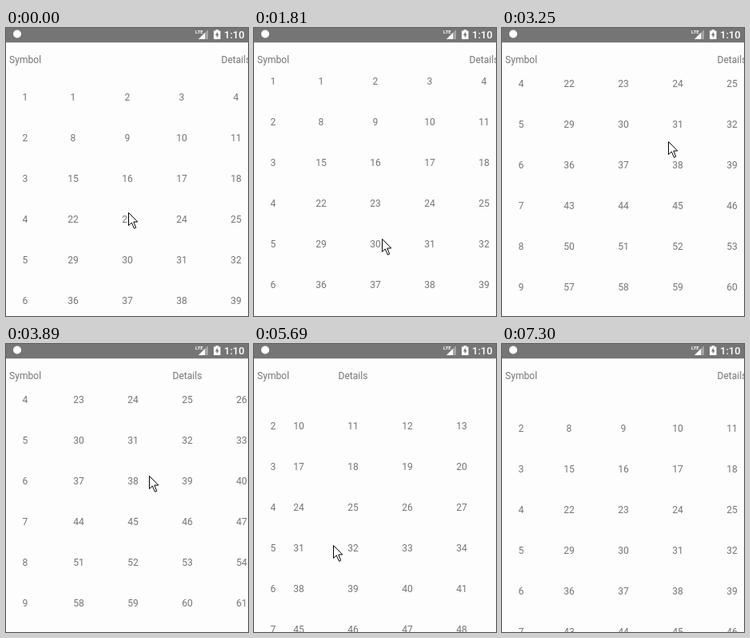
Recreate the animation shown at these times as an HTML page. Size 303 by 361 pixels, loop 7970 ms.

```html
<!DOCTYPE html>
<html lang="en">
<head>
<meta charset="utf-8">
<title>Scrolling table</title>
<style>
  html, body { margin: 0; width: 100%; height: 100%; overflow: hidden; background: #fdfdfd; }
  svg { display: block; }
  text { font: 12.1px Roboto, sans-serif; fill: #757575; }
  .mid { text-anchor: middle; }
  .clock { font-size: 13px; font-weight: 500; fill: #fff; }
  .lte { font-size: 6px; font-weight: 700; fill: #fff; }
</style>
</head>
<body>
<svg width="303" height="361" viewBox="0 0 303 361">
  <rect width="303" height="361" fill="#fdfdfd"/>

  <rect width="303" height="18.2" fill="#757575"/>
  <circle cx="14" cy="7.5" r="5" fill="#fff"/>
  <path d="M253 2V14H241Z" fill="#fff" opacity=".35"/>
  <path d="M249 6V14H241Z" fill="#fff"/>
  <text class="lte" x="237" y="7">LTE</text>
  <path d="M260 3.5H262.5V2H266V3.5H268.5V14H260Z" fill="#fff"/>
  <path d="M265 4.5L262 9.200H263.8V12.500L266.700 7.800H265Z" fill="#757575"/>
  <text class="clock" x="273" y="13">1:10</text>

  <text x="4" y="44">Symbol</text>
  <svg x="49" y="20" width="254" height="40" viewBox="49 20 254 40">
    <text id="details" class="mid" x="288" y="44">Details</text>
  </svg>
  <svg y="60" width="303" height="301" viewBox="0 60 303 301"><g id="labels"></g></svg>
  <svg x="49" y="60" width="254" height="301" viewBox="49 60 254 301"><g id="cells"></g></svg>

  <path id="cursor" d="M.5 .5V16.5L4.3 13L7.500 20.300L9.700 19.300L6.800 12H11.800Z" fill="#fff" stroke="#000"/>
</svg>
<script>
const ROWS = 12, COLS = 7, ROW_H = 51, COL_W = 68;
const LOOP = 7970, FRAME = 59.7, CURSOR_END = 7300;
const $ = id => document.getElementById(id);

function addText(parent, x, y, value) {
  const el = document.createElementNS('http://www.w3.org/2000/svg', 'text');
  el.setAttribute('class', 'mid');
  el.setAttribute('x', x);
  el.setAttribute('y', y);
  el.textContent = value;
  parent.append(el);
}

for (let r = 0; r < ROWS; r++) {
  const y = 91 + r * ROW_H;
  addText($('labels'), 24, y, r + 1);
  for (let c = 0; c < COLS; c++) addText($('cells'), 84 + c * COL_W, y, r * COLS + c + 1);
}

// Cursor strokes: start time, end time, dx, dy
const strokes = [
  [60, 110, 4, -3],
  [290, 990, -8, 53],
  [1120, 1390, 7, 18],
  [1580, 1810, 4, -35],
  [1810, 2860, -6, -160],
  [2860, 3460, 84, 60],
  [3460, 4616, -155, 3],
  [4616, 4900, 5, -63],
  [4900, 5690, 11, 148],
  [5690, 6080, -23, -30],
  [6080, 7240, 184, -10]
];

const ramp = (t, from, to) => Math.min(1, Math.max(0, (t - from) / (to - from)));

function move(id, x, y) {
  $(id).setAttribute('transform', `translate(${Math.round(x)} ${Math.round(y)})`);
}

const start = performance.now();
function draw() {
  const now = Math.max(0, performance.now() - start) % LOOP;
  const t = 19 + Math.floor((now - 7) / FRAME) * FRAME;

  const sx = 164 * (ramp(t, 3475, 4616) - ramp(t, 6140, 7240));
  const sy = 170 * ramp(t, 1668, 2854) - 138 * ramp(t, 4950, 5706);
  let x = 153, y = 231;
  for (const [from, to, dx, dy] of strokes) {
    const p = ramp(t, from, to);
    x += dx * p;
    y += dy * p;
  }

  move('details', -sx, 0);
  move('labels', 0, -sy);
  move('cells', -sx, -sy);
  move('cursor', x, y);
  $('cursor').style.display = now < CURSOR_END ? '' : 'none';
  requestAnimationFrame(draw);
}
draw();
</script>
</body>
</html>
```
